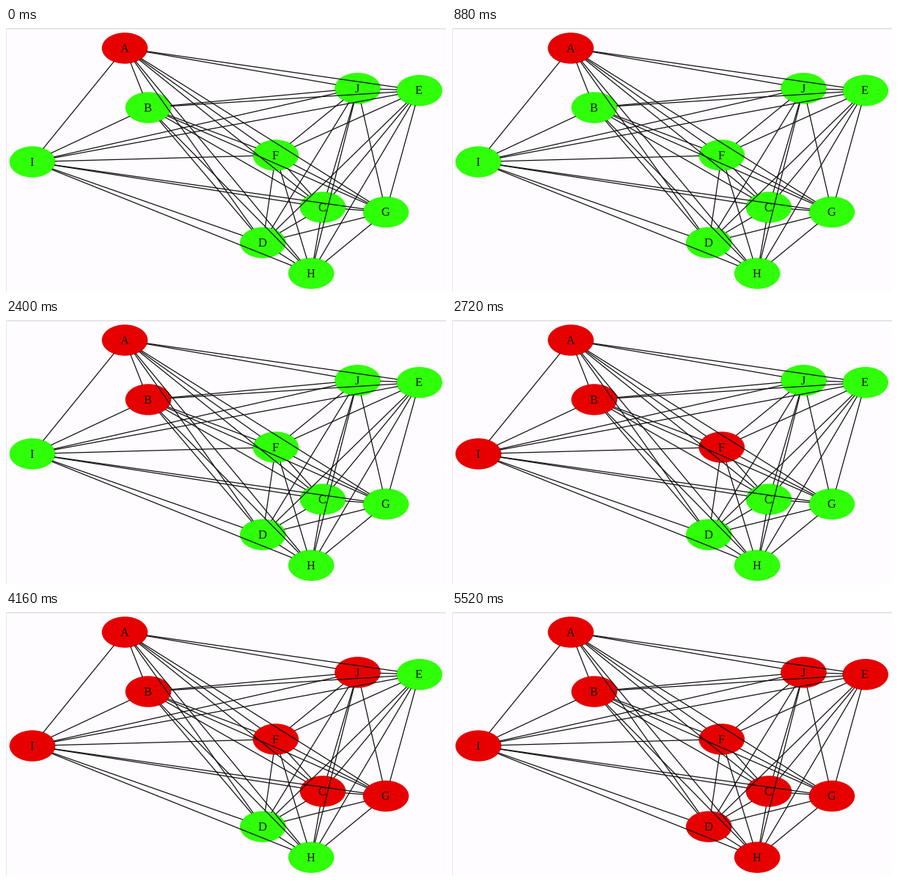
A matplotlib script that plays this animation: 600 px wide and 360 px high, repeating every 6200 ms.

```python
from itertools import combinations
from math import hypot

import matplotlib.pyplot as plt
from matplotlib.animation import FuncAnimation
from matplotlib.patches import Ellipse, Rectangle

W, H, DPI = 600, 360, 100
STEP = 40            # ms per frame
FRAMES = 155
RX, RY = 31.3, 21.2
GREEN, RED = "#30ff0a", "#e60000"

NODES = {
    "A": (162, 27.5), "B": (194, 108.5), "C": (432, 244.5),
    "D": (350.3, 292.7), "E": (563.7, 85.2), "F": (367.8, 173.5),
    "G": (518, 251), "H": (416.2, 334.6), "I": (36, 182.5),
    "J": (479.5, 82.3),
}
# Each wave of nodes and the time in ms at which it turns red.
WAVES = [("A", 0), ("B", 1240), ("FI", 2440), ("CGJ", 3640), ("DEH", 4840)]
TURN = {name: t for names, t in WAVES for name in names}


def px(size):
    """Pixels to points."""
    return size * 72 / DPI


def trim(p, q):
    """Segment between two node centres, cut at both ellipse rims."""
    dx, dy = q[0] - p[0], q[1] - p[1]
    k = 1 / hypot(dx / RX, dy / RY)
    return (p[0] + k * dx, q[0] - k * dx), (p[1] + k * dy, q[1] - k * dy)


fig = plt.figure(figsize=(W / DPI, H / DPI), dpi=DPI, facecolor="#fefcfe")
ax = fig.add_axes([0, 0, 1, 1])
ax.set_xlim(0, W)
ax.set_ylim(H, 0)
ax.axis("off")

for w, h in ((W, 2), (1, H)):
    ax.add_patch(Rectangle((0, 0), w, h, color="#e6e5e7", lw=0, zorder=0))

ovals = {}
for name, (x, y) in NODES.items():
    ovals[name] = ax.add_patch(
        Ellipse((x, y), 2 * RX, 2 * RY, facecolor=GREEN, lw=0, zorder=1))
    ax.text(x - 0.7, y + 5.2, name, family="Liberation Serif", size=px(16.5),
            color="#101000", ha="center", va="baseline", zorder=3)

for a, b in combinations(NODES, 2):
    ax.plot(*trim(NODES[a], NODES[b]), color="#101010", lw=px(1.25), zorder=2)


def draw(i):
    for name, oval in ovals.items():
        oval.set_facecolor(RED if i * STEP >= TURN[name] else GREEN)
    return list(ovals.values())


anim = FuncAnimation(fig, draw, frames=FRAMES, interval=STEP,
                     init_func=lambda: draw(0), repeat=True, repeat_delay=0)
plt.show()
```
